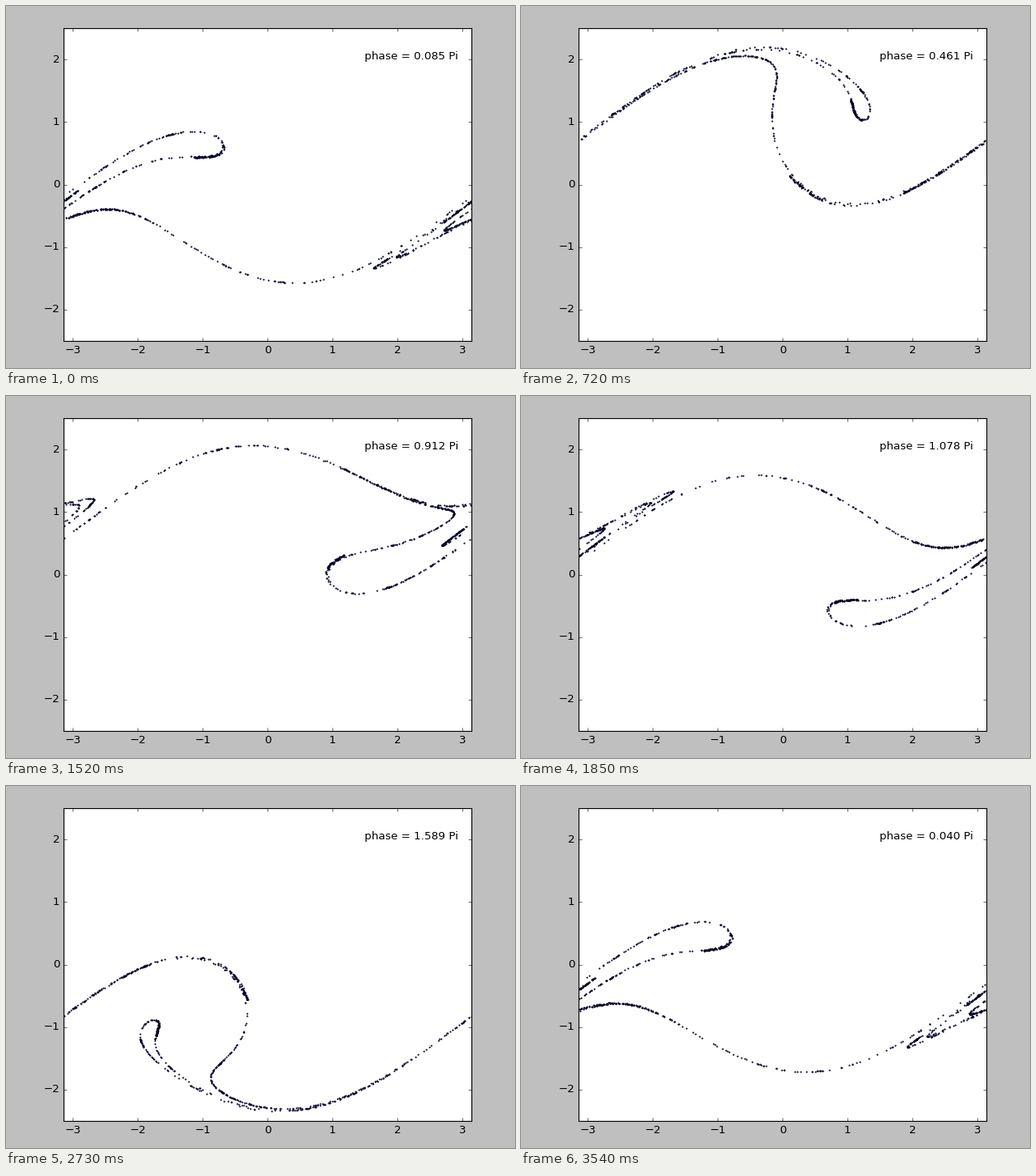
A matplotlib script that plays this animation: 619 by 441 pixels, repeating every 3610 ms.

```python
"""Poincare sections of a driven, damped pendulum, swept over the drive phase."""
import math

import matplotlib.pyplot as plt
import numpy as np
from matplotlib.animation import FuncAnimation

W, H, DPI = 619, 441, 80
LOOP_MS, TICK_MS = 3610, 10

# Pendulum: w' = -sin(a) - DAMPING * w + FORCE * sin(DRIVE * t)
DAMPING, FORCE, DRIVE = 0.5, 1.2, 2 / 3
PHASES = 133                  # sections per drive period
PHASE0 = 0.0852               # first phase, in units of pi
SETTLE, POINTS = 30, 760      # periods skipped, periods kept
LEAD = 1.6                    # sections the dots run ahead at peak drive


def accel(angle, speed, phase):
    return -math.sin(angle) - DAMPING * speed + FORCE * math.sin(phase)


def simulate():
    """Return angles and speeds, one row per period, one column per phase."""
    step = 2 * math.pi / PHASES
    dt = step / DRIVE
    a, w = 0.2, 0.0
    path = []
    for n in range((SETTLE + POINTS) * PHASES):
        path.append((a, w))
        p = PHASE0 * math.pi + (n % PHASES) * step
        k1 = accel(a, w, p)
        w2 = w + dt / 2 * k1
        k2 = accel(a + dt / 2 * w, w2, p + step / 2)
        w3 = w + dt / 2 * k2
        k3 = accel(a + dt / 2 * w2, w3, p + step / 2)
        w4 = w + dt * k3
        k4 = accel(a + dt * w3, w4, p + step)
        a += dt / 6 * (w + 2 * w2 + 2 * w3 + w4)
        w += dt / 6 * (k1 + 2 * k2 + 2 * k3 + k4)
        a = (a + math.pi) % (2 * math.pi) - math.pi
    data = np.array(path).reshape(-1, PHASES, 2)[SETTLE:]
    return data[..., 0], data[..., 1]


# A long first picture, a quick start, then an even pace to the end
starts = np.interp(np.arange(54), (0, 1, 9, 53), (0, 100, 580, 3540))
starts = starts // TICK_MS * TICK_MS
# The sweep slows and speeds up a little on its way round
sections = np.ceil(np.interp(starts, (0, 720, 1180, 1850, 3540),
                             (0, 25, 43, 66, 130))).astype(int)
angles, speeds = simulate()

plt.rcParams.update({
    "font.family": "DejaVu Sans", "font.size": 12,
    "axes.linewidth": 1.0,
    "xtick.top": True, "ytick.right": True,
    "xtick.direction": "in", "ytick.direction": "in",
    "xtick.major.size": 4, "ytick.major.size": 4,
    "xtick.major.width": 0.5, "ytick.major.width": 0.5,
    "xtick.major.pad": 4.8, "ytick.major.pad": 4,
    "ytick.alignment": "center",
})

fig = plt.figure(figsize=(W / DPI, H / DPI), dpi=DPI, facecolor="0.75")
ax = fig.add_axes([70 / W, 33 / H, 496 / W, 381 / H])
ax.set(xlim=(-math.pi, math.pi), ylim=(-2.5, 2.5),
       xticks=range(-3, 4), yticks=range(-2, 3))
dots, = ax.plot([], [], ".", ms=2.4, mfc="b", mec="k", mew=0.6)
label = ax.text(1.5, 2, "")


def draw(i):
    shot = np.searchsorted(starts, i * TICK_MS, side="right") - 1
    k = sections[shot]
    phase = (PHASE0 + 2 * k / PHASES) % 2
    ahead = round(k + LEAD * math.sin(phase * math.pi) ** 4) % PHASES
    dots.set_data(angles[:, ahead], speeds[:, ahead])
    label.set_text(f"phase = {phase:.3f} Pi")
    return dots, label


anim = FuncAnimation(fig, draw, frames=LOOP_MS // TICK_MS, interval=TICK_MS,
                     init_func=lambda: draw(0), repeat=True, repeat_delay=0)
plt.show()
```
